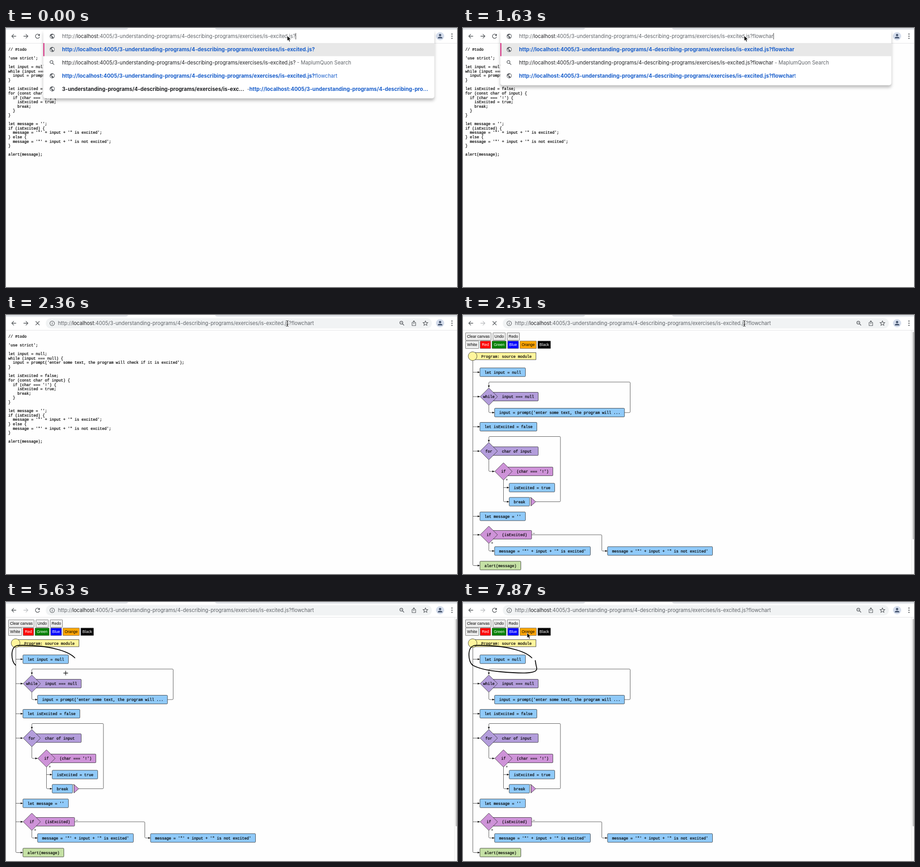
These frames come from a looping animation (986x568 px, 8 s). An HTML page:

```html
<!DOCTYPE html>
<html lang="en">
<head>
<meta charset="utf-8">
<title>Flowchart view</title>
<style>
html, body { margin: 0; width: 100%; height: 100%; overflow: hidden; background: #fefefe; }
svg { display: block; width: 986px; height: 568px; }
text { white-space: pre; }
.ui { font: 11.1px Inter, sans-serif; fill: #5f6368; }
.ui .dark { fill: #202124; }
.ui .blue { fill: #1a5fcb; }
.ui .bold { font-weight: 700; font-size: 11.43px; }
.mono { font: 8.333px "Liberation Mono", monospace; fill: #000; stroke: #000; stroke-width: .22; }
.btn { font: 8.53px "Liberation Sans", sans-serif; text-anchor: middle; }
.icon { fill: none; stroke: #54585c; stroke-width: 1.3; }
.wire { fill: none; stroke: #333; stroke-width: .8; }
.node { stroke: #222; stroke-width: .8; }
.drop { filter: drop-shadow(0 5px 3px rgba(0, 0, 0, .26)); }
</style>
</head>
<body>
<svg id="stage" viewBox="0 0 986 568" xmlns="http://www.w3.org/2000/svg"></svg>
<script>
const LOOP = 8000;
const HOST = ['http://', 'localhost'];
const PATH = '3-understanding-programs/4-describing-programs/exercises/is-excited.js?';
const REST = ':4005/' + PATH;
const URL_TEXT = HOST.join('') + REST;
const WORD = 'flowchart';
const BLUE = '#90caf9', VIOLET = '#b39ddb', PINK = '#ce93d8', GREEN = '#c5e1a5', YELLOW = '#fff59d';

const esc = s => s.replace(/&/g, '&amp;').replace(/</g, '&lt;');
const span = (s, cls) => `<tspan class="${cls}">${esc(s)}</tspan>`;
const text = (x, y, s, cls) => `<text x="${x}" y="${y}" class="${cls}">${esc(s)}</text>`;
const rect = (x, y, w, h, fill, extra = '') =>
  `<rect x="${x}" y="${y}" width="${w}" height="${h}" fill="${fill}" ${extra}/>`;
const path = (d, cls, extra = '') => `<path d="${d}" class="${cls}" ${extra}/>`;
const group = (id, body) => `<g id="${id}">${body}</g>`;

// ---- page with the program text ----
const CODE = `// #todo

'use strict';

let input = null;
while (input === null) {
  input = prompt('enter some text, the program will check if it is excited');
}

let isExcited = false;
for (const char of input) {
  if (char === '!') {
    isExcited = true;
    break;
  }
}

let message = '';
if (isExcited) {
  message = '"' + input + '" is excited';
} else {
  message = '"' + input + '" is not excited';
}

alert(message);`;

const codePage = () => CODE.split('\n')
  .map((s, i) => text(5, (49.8 + 9.61 * i).toFixed(2), s, 'mono')).join('');

// ---- page with the flowchart ----
const button = (x, y, w, label, fill = '#efefef', ink = '#000') =>
  rect(x + .5, y + .5, w - 1, 16.5, fill, 'stroke="#6f6f6f" stroke-width=".9" rx=".6"') +
  `<text x="${x + w / 2}" y="${y + 11.7}" class="btn" fill="${ink}">${label}</text>`;

const box = (x, cy, right, label, fill) =>
  rect(x, cy - 9.5, right - x, 19, fill, 'class="node" rx="1.5"') +
  text(x + 10, cy + 3, label, 'mono');

const test = (cx, cy, right, word, label, fill) =>
  rect(cx, cy - 9.5, right - cx, 19, fill, 'class="node" rx="1.5"') +
  path(`M${cx} ${cy - 19}l19 19l-19 19l-19 -19z`, 'node', `fill="${fill}"`) +
  text(cx - word.length * 2.5, cy + 3, word, 'mono') +
  text(cx + 28.8, cy + 3, label, 'mono');

const arrow = (x, y) => path(`M${x} ${y}l-5 -2.1v4.2z`, '', 'fill="#111"');
const arrowDown = (x, y) => path(`M${x} ${y}l-2.1 -5h4.2z`, '', 'fill="#111"');
const wire = d => path(d, 'wire');

// down from a point, then right into a box
const elbow = (x, y, toX, toY) =>
  wire(`M${x} ${y}V${toY - 2}q0 2 2 2H${toX}`) + arrow(toX, toY);

// back from a body to the top of its loop
const loopBack = (x, y, side, top, cx) =>
  wire(`M${x} ${y}H${side - 2}q2 0 2 -2V${top + 2}q0 -2 -2 -2H${cx + 2}q-2 0 -2 2V${top + 12}`) +
  arrowDown(cx, top + 12.5);

function chartPage() {
  const buttons =
    button(5, 38.5, 57, 'Clear canvas') + button(65, 38.5, 28, 'Undo') + button(96, 38.5, 28, 'Redo') +
    button(5, 56.5, 30, 'White') + button(37, 56.5, 24, 'Red', '#f00', '#fff') +
    button(63, 56.5, 32, 'Green', '#008000', '#fff') + button(97, 56.5, 25, 'Blue', '#00f', '#fff') +
    button(124, 56.5, 37, 'Orange', '#ffa500') + button(163, 56.5, 29, 'Black', '#000', '#fff');

  const spine = [125.5, 179, 245, 298.5, 441.5, 482]
    .map(y => wire(`M21.5 ${y}H37`) + arrow(37, y)).join('') + elbow(21.5, 100, 37, 549.5);

  const wires =
    elbow(56.5, 198, 69, 214) + loopBack(353, 214, 365.5, 147, 56.5) +
    elbow(56.5, 317, 69, 343) + loopBack(159, 409.5, 213, 266.5, 56.5) +
    elbow(88.5, 362, 101, 409.5) + wire('M88.5 378.5H101') + arrow(101, 378.5) +
    elbow(56.5, 501, 69, 517.5) +
    wire('M150 482H301.5q2 0 2 2V515.5q0 2 2 2H316') + arrow(316, 517.5);

  const nodes =
    rect(21, 82.5, 138.5, 15.5, YELLOW, 'class="node"') +
    `<circle cx="21" cy="90.3" r="9.6" fill="${YELLOW}" class="node"/>` +
    text(40, 93.5, 'Program: source module', 'mono') +
    box(37, 125.5, 136.5, 'let input = null', BLUE) +
    test(56.5, 179, 164.5, 'while', 'input === null', VIOLET) +
    box(69, 214, 353, "input = prompt('enter some text, the program will ...", BLUE) +
    box(37, 245, 161.5, 'let isExcited = false', BLUE) +
    test(56.5, 298.5, 164.5, 'for', 'char of input', VIOLET) +
    test(88.5, 343, 196.5, 'if', "(char === '!')", PINK) +
    box(101, 378.5, 200.5, 'isExcited = true', BLUE) +
    box(101, 409.5, 145.5, 'break', BLUE) +
    wire('M145.5 400.5H148.5V419') +
    path('M148.7 400.3L159 409.5L148.7 418.7z', 'node', `fill="${PINK}"`) +
    box(37, 441.5, 136.5, "let message = ''", BLUE) +
    test(56.5, 482, 150, 'if', '(isExcited)', PINK) +
    box(69, 517.5, 278.5, `message = '"' + input + '" is excited'`, BLUE) +
    box(316, 517.5, 545.5, `message = '"' + input + '" is not excited'`, BLUE) +
    box(37, 549.5, 126.5, 'alert(message)', GREEN) +
    path('M93.5 361h4.4M95.7 358.8v4.4M61.5 499.7h4.4M63.7 497.5v4.4M152.5 479h4.6', 'wire');

  const bar = rect(980, 34, 6, 534, '#fafafa') + rect(980, 34, .8, 534, '#e6e6e6') +
    rect(983, 37, 3.5, 455, '#c1c1c1', 'rx="1.7"');
  return buttons + spine + wires + nodes + bar;
}

// ---- browser frame ----
const globe = (x, y) =>
  `<circle cx="${x}" cy="${y}" r="5.5" fill="#5f6368"/>` +
  path('M-1 7.93C-4.95 7.44-8 4.08-8 0c0-.62.08-1.21.21-1.79L-3 3v1c0 1.1.9 2 2 2z' +
    'M5.9 5.39C5.64 4.58 4.9 4 4 4H3V1c0-.55-.45-1-1-1H-4v-2h2c.55 0 1-.45 1-1v-2h2c1.1 0 2-.9 2-2v-.41C5.93-6.22 8-3.35 8 0c0 2.08-.8 3.97-2.1 5.39z',
    '', `fill="#fff" transform="translate(${x} ${y}) scale(.55)"`);
const lens = (x, y) => path(`M${x + 1.2} ${y + 1.2}l3.6 3.6M${x + 2} ${y - 1.2}a3.2 3.2 0 1 0 -6.4 0a3.2 3.2 0 1 0 6.4 0`, 'icon');

const chrome =
  rect(0, 0, 986, 33.5, '#fff') +
  path('M0 0H267Q265.5 3.5 261 3.5H0zM457 0H986V3.5H463Q458.5 3.5 457 0z', '', 'fill="#dee1e6"') +
  rect(0, 33, 986, .8, '#dcdee0') +
  path('M22.2 18H12.8M17.2 13.4L12.6 18L17.2 22.6', 'icon') +
  path('M38.3 18H47.7M43.3 13.4L47.9 18L43.3 22.6', 'icon', 'id="forward"') +
  group('reload', path('M72.6 15.2A4.6 4.6 0 1 0 73.4 19.4', 'icon') +
    path('M74 12.6V17.2H69.4z', '', 'fill="#54585c"')) +
  path('M64.8 13.8l8.4 8.4M73.2 13.8l-8.4 8.4', 'icon', 'id="stop"') +
  '<circle cx="949" cy="18" r="9" fill="#d5ddec"/>' +
  '<circle cx="949" cy="15.6" r="2.5" fill="#44546f"/>' +
  path('M944 22.8v-1q0-2.6 5-2.6t5 2.6v1z', '', 'fill="#44546f"') +
  [13.3, 18, 22.7].map(y => `<circle cx="975" cy="${y}" r="1.3" fill="#54585c"/>`).join('');

const address = (x, id) =>
  `<text x="${x}" y="22" class="ui">${span(HOST[0], '')}${span(HOST[1], 'dark')}${span(REST, '')}<tspan id="${id}"></tspan></text>`;

const closedBar =
  rect(87, 7, 844, 22.5, '#f1f3f4', 'rx="11.2"') +
  '<circle cx="101" cy="18.3" r="5" class="icon" style="stroke-width:1.1"/>' +
  rect(100.4, 17.4, 1.2, 3.6, '#54585c') + rect(100.4, 15.2, 1.2, 1.3, '#54585c') +
  address(113.4, 'closedWord') +
  lens(865.5, 18) + path('M863 16.8h2.8', 'icon', 'style="stroke-width:.9"') +
  path('M889.8 16.6h-2v6.6h7.8v-6.6h-2M891.7 20v-6.8M889.3 15.2l2.4-2.4l2.4 2.4', 'icon', 'style="stroke-width:1.1"') +
  path('M917 13l1.5 3.4l3.7 .3l-2.8 2.4l.9 3.6l-3.3-1.9l-3.3 1.9l.9-3.6l-2.8-2.4l3.7-.3z', 'icon', 'style="stroke-width:1.1"');

const LEFT = 122.5;
const row = (id, y, body = '') => `<text id="${id}" class="ui" x="${LEFT}" y="${y}">${body}</text>`;

const openBar =
  rect(81.5, 4, 855, 150, '#fff', 'id="panel" rx="5" class="drop"') +
  rect(81.5, 33, 855, 28.8, '#e8e8e8') + rect(81.5, 33, 2.4, 28.8, '#d63384') +
  globe(101, 18) + address(LEFT, 'openWord') +
  rect(0, 11, 1, 14, '#333', 'id="caret"') +
  globe(101, 47) + row('row1', 51) +
  lens(100.6, 75.8) + row('row2', 79.9) +
  group('third', globe(101, 104.7) + row('row3', 108.7)) +
  group('fourth', globe(101, 133.4) +
    row('row4', 137.5, span(PATH.slice(0, PATH.indexOf('ited')) + '...', 'dark bold') + span('  -', '')) +
    `<text class="ui" x="532" y="137.5">${span(URL_TEXT.slice(0, URL_TEXT.indexOf('grams/exer')) + '...', 'blue bold')}</text>`);

// ---- hand-drawn ring in two arcs, and pointers ----
const INK = 'fill="none" stroke="#000" stroke-width="1.8" stroke-linecap="round"';
const ring =
  path('M150.5 122.5C137 108 100 98 62 96C45 95 30 94 23 96C14 99 13 108 13 116C13 126 16 134 21 138.5', '', `id="arc0" ${INK}`) +
  path('M21 138.5C36 147 60 151 82 153C105 155 130 157 145 155C162 153 163 148 160 140L158 128.5', '', `id="arc1" ${INK}`);

const outlined = (d, w) =>
  path(d, '', `fill="none" stroke="#fff" stroke-width="${w + 1.4}" opacity=".8"`) +
  path(d, '', `fill="none" stroke="#000" stroke-width="${w}"`);
const pointers =
  group('arrow', path('M0 0V11.4L2.6 9L4.4 13.2L6.5 12.3L4.7 8.2H8.3z', '', 'fill="#000" stroke="#fff" stroke-width=".9"')) +
  group('beam', outlined('M-2.6 -6Q0 -6 0 -4V4.5Q0 6.5 -2.6 6.5M2.6 -6Q0 -6 0 -4M0 4.5Q0 6.5 2.6 6.5M-1.5 2.6H1.5', 1)) +
  group('cross', outlined('M-5 0H5M0 -5V5', 1.1));

document.getElementById('stage').innerHTML =
  rect(0, 0, 986, 568, '#fefefe') + group('code', codePage()) + group('chart', chartPage() + ring) +
  chrome + group('closed', closedBar) + group('open', openBar) + pointers;

const $ = id => document.getElementById(id);
const show = (id, on) => $(id).setAttribute('visibility', on ? 'inherit' : 'hidden');
const arcs = ['arc0', 'arc1'].map($);
const lengths = arcs.map(a => a.getTotalLength());
$('closedWord').textContent = WORD;

// start time, pointer kind, position
const MOVES = [
  [0, 'arrow', 614.8, 17], [2360, 'beam', 615, 18.3],
  [3110, 'cross', 600, 70], [3258, 'cross', 560, 130], [3406, 'cross', 490, 220], [3554, 'cross', 430, 235],
  [3702, 'cross', 300, 180], [3850, 'cross', 170, 131], [3998, 'cross', 153, 112], [4146, 'cross', 149.5, 104.5],
  [4300, 'cross', 149.5, 123], [6378, 'cross', 150, 124], [6526, 'cross', 141, 120],
  [7280, 'cross', 139, 96], [7430, 'arrow', 133, 53.5], [7720, 'arrow', 136.5, 60], [7868, 'arrow', 140, 67.5]
];
const TICK = 148, PEN_START = 4590, PEN_END = 6378;
// pen position per tick: 0..1 on the first arc, 1..2 on the second
const PEN = [.08, .2, .36, .52, .67, .83, 1, 1.68, 1.85, 1.93, 2];

function penPoint(u) {
  const i = u > 1 ? 1 : 0;
  return arcs[i].getPointAtLength((u - i) * lengths[i]);
}

let typed = -1;
function type(n) {
  if (n === typed) return;
  typed = n;
  const word = WORD.slice(0, n), full = URL_TEXT + word;
  $('openWord').textContent = word;
  $('row1').innerHTML = span(full, 'blue bold');
  $('row2').innerHTML = span(full, 'dark') + span(' - MaplumQuon Search', '');
  $('row3').innerHTML = span(full, 'blue bold') + span(WORD.slice(n), 'blue');
  const rows = n === 0 ? 4 : n < WORD.length ? 3 : 2;
  $('panel').setAttribute('height', 35 + 28.8 * rows);
  $('third').setAttribute('display', rows > 2 ? 'inline' : 'none');
  $('fourth').setAttribute('display', rows > 3 ? 'inline' : 'none');
  $('caret').setAttribute('x', LEFT + $('openWord').parentNode.getComputedTextLength());
}

function draw(t) {
  const open = t < 2360, chart = t >= 2510, loaded = t >= 2660;
  show('open', open);
  show('closed', !open);
  show('code', !chart);
  show('chart', chart);
  show('stop', !open && !loaded);
  show('reload', open || loaded);
  $('forward').style.stroke = chart ? '#bcbec1' : '#54585c';

  const keys = t < 740 ? 0 : Math.min(8, Math.floor((t - 740) / 147) + 1);
  type(keys < 7 ? keys : keys + 1);
  show('caret', open && (t < 450 || t >= 740));

  const k = Math.floor((t - PEN_START) / TICK);
  const at = i => i < 0 ? 0 : PEN[Math.min(i, PEN.length - 1)];
  const inked = at(k - 1);
  arcs.forEach((a, i) => {
    const part = Math.max(0, Math.min(1, inked - i));
    a.setAttribute('stroke-dasharray', `${part * lengths[i]} 999`);
    a.setAttribute('visibility', chart && part > 0 ? 'visible' : 'hidden');
  });

  let [, kind, x, y] = MOVES.filter(m => m[0] <= t).pop();
  if (t >= PEN_START && t < PEN_END) ({ x, y } = penPoint(at(k)));
  for (const id of ['arrow', 'beam', 'cross']) show(id, id === kind);
  $(kind).setAttribute('transform', `translate(${x} ${y})`);
}

function frame() {
  draw(performance.now() % LOOP);
  requestAnimationFrame(frame);
}
frame();
</script>
</body>
</html>
```
